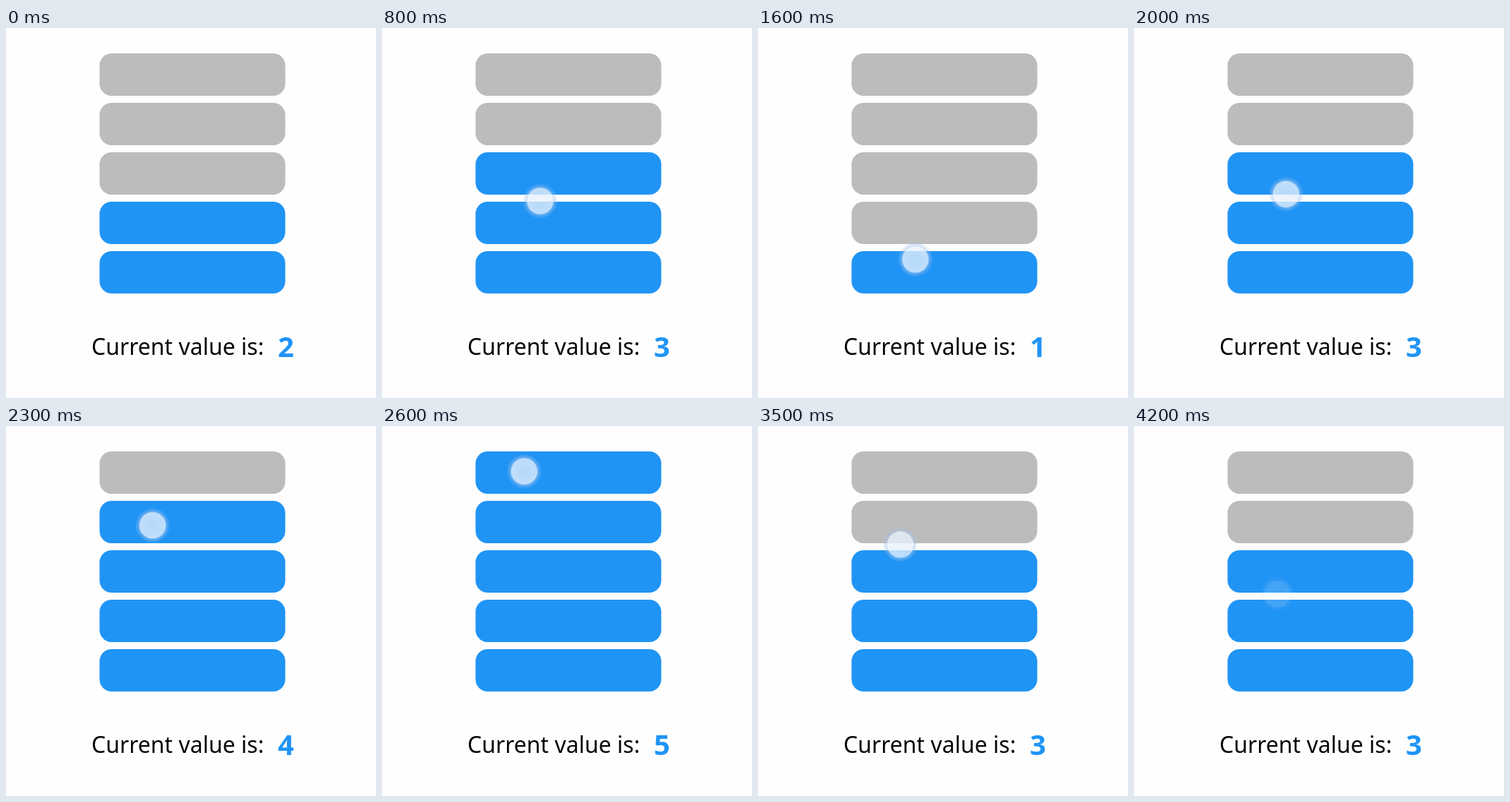
Recreate the animation shown at these times as an HTML page. Size 524 by 524 pixels, loop 4300 ms.

```html
<!DOCTYPE html>
<html lang="en">
<head>
<meta charset="utf-8">
<title>Level slider</title>
<style>
  html, body { margin: 0; width: 100%; height: 100%; overflow: hidden; background: #fefefe; }
  svg { display: block; width: 100%; height: 100%; }
  text { font-family: "Noto Sans", "Open Sans", sans-serif; }
  #label { font-size: 32px; fill: #060606; }
  #value { font-size: 40px; font-weight: 700; fill: #2094f5; }
</style>
</head>
<body>
<svg viewBox="0 0 524 524">
  <defs>
    <radialGradient id="glow">
      <stop offset="0" stop-color="#e8f1fc" stop-opacity=".74"/>
      <stop offset=".72" stop-color="#e8f1fc" stop-opacity=".8"/>
      <stop offset=".79" stop-color="#a0c2ec" stop-opacity=".48"/>
      <stop offset="1" stop-color="#a0c2ec" stop-opacity="0"/>
    </radialGradient>
  </defs>
  <g id="bars"></g>
  <text id="label" x="121" y="463">Current value is:</text>
  <text id="value" x="385" y="466">2</text>
  <circle id="touch" r="25" fill="url(#glow)"/>
</svg>
<script>
  const LOOP = 4300, STEP = 100, PRESS = 600, RELEASE = 4200;
  const BARS = 5, PITCH = 70, HEIGHT = 60, BOTTOM = 376;
  const $ = id => document.getElementById(id);
  const clamp = v => Math.min(1, Math.max(0, v));
  const ease = k => (1 - Math.cos(Math.PI * clamp(k))) / 2;

  // Turning points of the drag, joined by eased strokes.
  const turns = [
    { t: 500, x: 224, y: 213 },
    { t: 1400, x: 224, y: 341 },
    { t: 2900, x: 199, y: 35 },
    { t: 3900, x: 203, y: 238 }
  ];

  const bars = Array.from({ length: BARS }, (_, i) => {
    const bar = document.createElementNS("http://www.w3.org/2000/svg", "rect");
    const box = { x: 132.5, y: BOTTOM - HEIGHT - PITCH * i, width: 263, height: HEIGHT, rx: 17 };
    for (const key in box) bar.setAttribute(key, box[key]);
    return $("bars").appendChild(bar);
  });

  function touchAt(t) {
    const { x, y } = turns[0];
    const pos = { x, y };
    turns.slice(1).forEach((to, i) => {
      const from = turns[i], k = ease((t - from.t) / (to.t - from.t));
      pos.x += (to.x - from.x) * k;
      pos.y += (to.y - from.y) * k;
    });
    return pos;
  }

  // Bars 2 and 4 react only inside their own edges; the gaps belong to the others.
  function levelAt(y) {
    const edges = [1, 3].flatMap(i => [BOTTOM - PITCH * i, BOTTOM - PITCH * i - HEIGHT]);
    return 1 + edges.filter(edge => y < edge).length;
  }

  function draw(now) {
    const t = Math.floor((now % LOOP) / STEP) * STEP;
    const { x, y } = touchAt(t);
    const level = t < PRESS ? 2 : levelAt(y);
    bars.forEach((bar, i) => bar.setAttribute("fill", i < level ? "#2094f5" : "#bcbcbc"));
    $("value").textContent = level;

    const fadeIn = clamp((t - PRESS + 50) / STEP), fadeOut = clamp((RELEASE + 22 - t) / STEP);
    $("touch").setAttribute("cx", x);
    $("touch").setAttribute("cy", y);
    $("touch").setAttribute("opacity", fadeIn * fadeOut);
  }

  const start = performance.now();
  function tick() {
    draw(performance.now() - start);
    requestAnimationFrame(tick);
  }
  tick();
</script>
</body>
</html>
```
